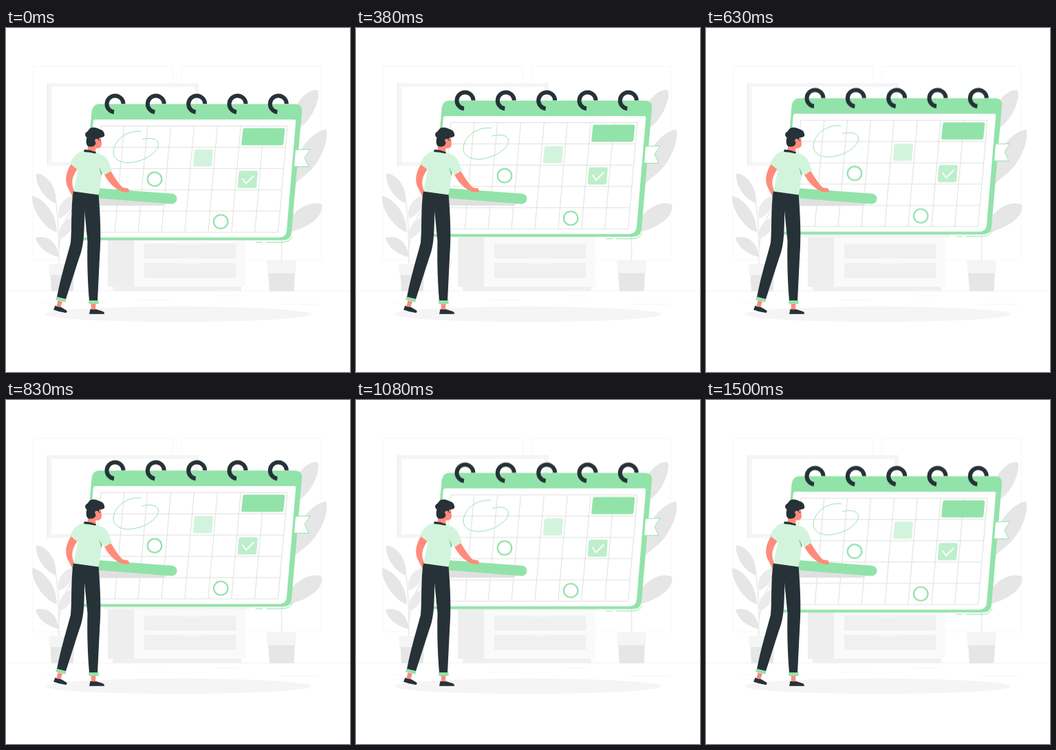
Write an HTML page without scripts that moves like this. It is 500 by 500 pixels and loops after 1.54 s.

```html
<!DOCTYPE html>
<html lang="en">
<head>
<meta charset="utf-8">
<title>Planning calendar</title>
<style>
  html, body { margin: 0; width: 100%; height: 100%; overflow: hidden; background: #fff; }
  svg { display: block; width: 100%; height: 100%; }
  .green { fill: #92e3a9; }
  .dark { fill: #263238; }
  .skin { fill: #ff8b7b; }
  .shirt { fill: #d3f4dc; }
  .white { fill: #fff; }
  .leaf { fill: #e6e6e6; }
  .pale { fill: #f5f5f5; }
  .mid { fill: #f0f0f0; }
  .faint { fill: none; stroke: #f7f7f7; }
  .stem { fill: none; stroke: #e9e9e9; stroke-width: 1.5; }
  .grid { fill: none; stroke: #e0e0e0; }
  .outline { fill: none; stroke: #92e3a9; }
  .ring { fill: none; stroke: #263238; stroke-width: 6; }
  .calendar { animation: float 1540ms linear infinite; }
  @keyframes float {
    0% { transform: translateY(0); }
    46.43% { transform: translateY(-9.5px); }
    95.13% { transform: translateY(.5px); }
    100% { transform: translateY(0); }
  }
</style>
</head>
<body>
<svg viewBox="0 0 500 500">
  <defs>
    <path id="ring" class="ring" d="M170.5 110.3A12 12 0 1 0 157 122.3"/>
    <path id="column" class="grid" d="M137.8 142.5L124.3 297"/>
    <path id="row" class="grid" d="M137.8 142.5H409"/>
    <g id="drawer">
      <path class="mid" d="M201 313.500H334.500V335H201Z"/>
      <path class="pale" d="M249 313H286L283 315.500H252Z"/>
    </g>
  </defs>

  <!-- Room -->
  <path class="faint" d="M39 55.500H242.500V337H39ZM255 55.500H458V337H255Z"/>
  <path class="pale" d="M60 80H280V200.500H60Z"/>
  <path class="white" d="M66.500 85.500H274V195H66.500Z"/>
  <path d="M60.500 80V200.500" stroke="#e8e8e8"/>
  <path d="M0 382.300H500" stroke="#f0f0f0" stroke-width=".7"/>
  <path class="faint" d="M53 399.500H70M193 395.500H240M304 389.500H337M398 401.500H455"/>
  <ellipse class="pale" cx="249.500" cy="416" rx="193.500" ry="11.200"/>

  <!-- Left plant -->
  <path class="stem" d="M77 343C76 315 78 285 72 250M77 320Q81 284 97 262"/>
  <path class="leaf" d="M44 211.500C55 211 74 226 73 255C57 250 42 228 44 211.500ZM38 244C53 247 74 268 74 297C55 291 36 262 38 244ZM43 305C57 300 75 309 77 333C61 329 47 320 43 305Z"/>
  <path fill="#ebebeb" d="M101 242C84 246 73 259 77 277C91 272 99 258 101 242ZM101 274C84 278 74 290 78 307C92 301 100 288 101 274Z"/>
  <path class="pale" d="M62 343H101V359H63Z"/>
  <path class="leaf" d="M64.500 359H99L97.500 382.500H66Z"/>

  <!-- Right plant -->
  <path class="stem" d="M400.500 340V290Q404 210 422 150"/>
  <path class="leaf" d="M452 90C458 94 451 120 437 136Q427 147 413 153C408 128 431 88 452 90ZM465 147.500C471 160 457 197 436 213Q424 222 409 237C409 200 438 151 465 147.500ZM459.500 257C461 274 443 290 402 300C408 272 438 247 459.500 257Z"/>
  <path class="pale" d="M379 338H422L421 357H380Z"/>
  <path class="leaf" d="M381 356.500H420L418.500 382.500H383Z"/>

  <!-- Cabinet -->
  <path fill="#fafafa" d="M186 300H348V376H186Z"/>
  <path fill="#eee" d="M148 300H186V376H148Z"/>
  <path class="mid" d="M155 376H342V382.300H155Z"/>
  <path class="pale" d="M143 299H354V304.500H143Z"/>
  <use href="#drawer"/>
  <use href="#drawer" y="28"/>

  <g class="calendar">
    <path class="green" d="M136 110.500H420Q431 110.500 430 122L415 297Q414 308.500 402 308.500H105L109.500 297L124.500 122Q126 110.500 136 110.500Z"/>
    <path class="white" d="M130 133H418.500Q421.500 133 421.200 136L408 294Q407 304.500 397 304.500H112L126.800 136Q127 133 130 133Z"/>
    <use href="#row"/>
    <use href="#row" x="-2.700" y="30.900"/>
    <use href="#row" x="-5.400" y="61.800"/>
    <use href="#row" x="-8.100" y="92.700"/>
    <use href="#row" x="-10.800" y="123.600"/>
    <use href="#row" x="-13.500" y="154.500"/>
    <use href="#column"/>
    <use href="#column" x="33.900"/>
    <use href="#column" x="67.800"/>
    <use href="#column" x="101.700"/>
    <use href="#column" x="135.600"/>
    <use href="#column" x="169.500"/>
    <use href="#column" x="203.400"/>
    <use href="#column" x="237.300"/>
    <use href="#column" x="271.200"/>

    <path class="outline" d="M196.500 150.500C177 148 157 162 156 180C156 193 172 199 190 194C208 190 223 177 221.500 168C220 160 208 159 198 162"/>
    <path class="green" d="M347 145.500H403Q405.500 145.500 405.300 148L403.300 168Q403 170.500 400.500 170.500H344.500Q342 170.500 342.200 168L344.300 148Q344.500 145.500 347 145.500Z"/>
    <path class="shirt" d="M276.500 176.500H298.500Q301.200 176.500 301 179L299.300 199Q299 201.500 296.500 201.500H274.500Q271.800 201.500 272 199L273.800 179Q274 176.500 276.500 176.500Z"/>
    <path fill="#beeecb" d="M341 207.500H363.500Q366 207.500 365.800 210L364.200 230Q364 232.500 361.500 232.500H339Q336.500 232.500 336.700 230L338.300 210Q338.500 207.500 341 207.500Z"/>
    <path d="M343.500 218.500L349 226L360.500 214.500" fill="none" stroke="#fff" stroke-width="2"/>
    <g class="outline" stroke-width="2.200">
      <ellipse cx="216" cy="219.700" rx="10.300" ry="10"/>
      <ellipse cx="312.200" cy="281.500" rx="10.300" ry="10"/>
    </g>
    <path class="outline" d="M363 311.300H373M378 311.300H402Q413 311 416 303"/>
    <path d="M420.500 177L442 176.500L434 188.500L440 201.500H418.500Z" fill="#fff" stroke="#92e3a9"/>
    <use href="#ring"/>
    <use href="#ring" x="59.300"/>
    <use href="#ring" x="118.700"/>
    <use href="#ring" x="178"/>
    <use href="#ring" x="237.300"/>
  </g>

  <!-- Bar being placed -->
  <path fill="#e0e0e0" d="M130 246L236 254L229 258.300H130Z"/>
  <path class="green" d="M130 232.500L241.500 240.700A7.500 7.500 0 0 1 240.500 255.700L130 247Z"/>

  <!-- Man -->
  <path class="skin" d="M95 197C86 211 86 222 89 230L97 246L100 238C95 228 94 219 104 205ZM142 211L151 206C158 217 164 227 170 232L177 233Q181 237 177 239L169 238C158 234 148 224 142 211Z"/>
  <path class="skin" d="M75.500 396L82 398L79 406L73.500 404ZM123.500 400H130.500L130 410H124Z"/>
  <path class="dark" d="M71.500 403.500Q76 406 79.500 405.500L88 410.500Q89.500 413 87 414Q78 413 69 409.500ZM122.500 408.500Q127 410 130.500 408.800L141 412Q143.500 413.500 143 415.800H121Z"/>
  <path class="dark" d="M98 236L134.500 241C138 285 138 310 136 335L133 397H121C118 360 118 330 118.500 310L114 265C114 300 113 318 106 335L87 394L74 391C80 360 88 335 94 312C96 290 94 260 98 236Z"/>
  <path class="green" d="M73.500 390.500L87.500 394.500L86 398.500L72 395ZM120 396H134.500V401H120.500Z"/>
  <path class="skin" d="M129 156L137.500 157L139 168Q139 174 134 174.500L130 175.500L131 182L118 179L120 168Z"/>
  <path class="shirt" d="M113 179Q123 180 131 181.500Q145 184 149 194L154 207L143.500 213.500L139.500 209Q138 226 134.500 242.500L98 237.500L104.500 206.500L93 197Q101 180 113 179Z"/>
  <path d="M135 202L140 211L138.500 215Z" fill="#7fc394"/>
  <path class="dark" d="M114 176.500Q123 177 131 180.500L130 182.500Q121 180 113 180Z"/>
  <path class="dark" d="M116 158C113 152 118 152 121 147C126 142 133 146 137 147.500C141 148 144 153 143 157C140 160 137 158 135.500 160L134 164L131 163L130 169Q127 174 119 172Q115 168 117.500 159Z"/>
  <circle class="skin" cx="131.700" cy="163.500" r="2.500"/>
  <path d="M135 163.500Q136 162.500 137.500 163.500" fill="none" stroke="#263238" stroke-width=".8"/>
</svg>
</body>
</html>
```
